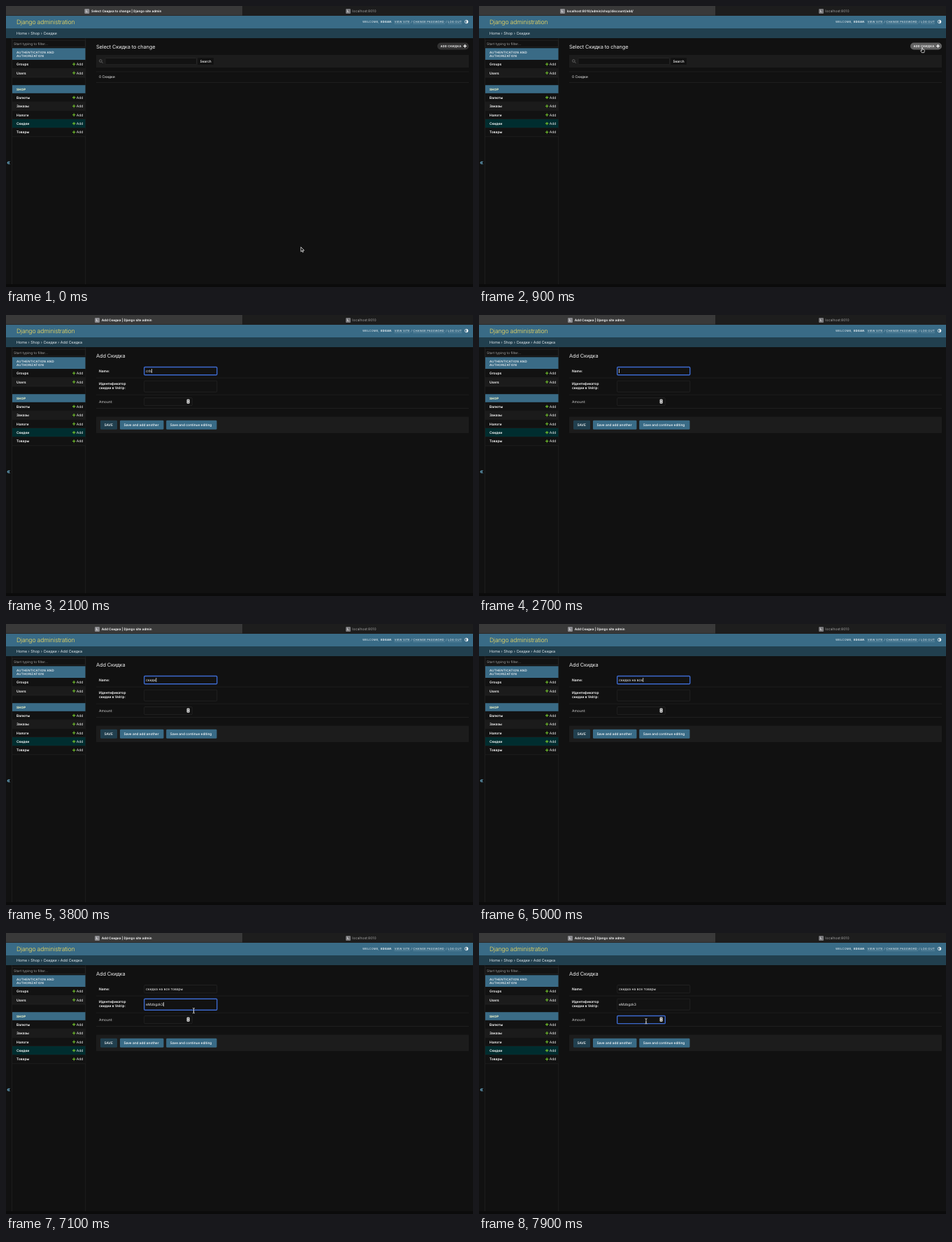
Recreate the animation shown at these times as an HTML page. Size 668x402 px, loop 8 s.

```html
<!DOCTYPE html>
<html lang="ru">
<head>
<meta charset="utf-8">
<title>Admin form</title>
<style>
html, body { margin: 0; width: 100%; height: 100%; overflow: hidden; background: #111; }
svg { display: block; width: 100vw; height: 100vh; }
text {
  font-family: Inter, Roboto, "Noto Sans", sans-serif;
  font-size: 5px; fill: #eee; white-space: pre;
  text-rendering: geometricPrecision;
}
.tab { font-size: 4.68px; font-weight: 600; fill: #fff; }
.dim { fill: #a2a2a2; }
.brand { font-size: 8.7px; font-weight: 300; letter-spacing: -.2px; fill: #f5dd5d; }
.tools { font-size: 4.1px; letter-spacing: .2px; fill: #e9f0f3; }
.crumb { font-size: 5.38px; fill: #e2eaee; }
.cap { font-size: 4.44px; font-weight: 500; letter-spacing: .19px; fill: #fff; }
.cur { font-weight: 700; fill: #ffc; }
.bold { font-size: 4.88px; font-weight: 600; fill: #fff; }
.btn { font-size: 4.82px; font-weight: 500; fill: #fff; }
.h1 { font-size: 7.4px; letter-spacing: -.12px; }
.pill { font-size: 4.1px; font-weight: 600; letter-spacing: .17px; fill: #fff; }
.line { stroke: #2a2a2a; stroke-width: .5; fill: none; }
.field { fill: #121212; stroke: #303030; stroke-width: .5; }
.field.on { stroke: #3c69cd; stroke-width: 1.4; }
</style>
</head>
<body>
<svg viewBox="0 0 668 402" preserveAspectRatio="none">
  <rect width="668" height="402" fill="#111"/>

  <!-- browser tabs -->
  <rect width="668" height="14" fill="#1d1d1d"/>
  <rect width="338" height="13.5" fill="#393939"/>
  <g id="tab">
    <rect y="4" width="7" height="7" rx="1.3" fill="#8b8b8f"/>
    <text class="tab" x="2" y="9.3">L</text>
    <text class="tab" x="9.8" y="9.2" id="tabText"></text>
  </g>
  <rect x="486" y="4" width="7" height="7" rx="1.3" fill="#77777a"/>
  <text class="tab" x="488" y="9.3">L</text>
  <text class="dim" x="495.3" y="9.2">localhost:8010</text>

  <!-- header -->
  <rect y="14" width="668" height="18" fill="#396b86"/>
  <rect y="32" width="668" height="14" fill="#213f4e"/>
  <text class="brand" x="15" y="26">Django administration</text>
  <g class="tools">
    <text class="tools" x="510" y="23.8">WELCOME,</text>
    <text class="tools" x="536" y="23.8"><tspan font-weight="700">EDGAR</tspan>.</text>
    <text class="tools" x="555.5" y="23.8">VIEW SITE</text>
    <text class="tools" x="579.2" y="23.8">/</text>
    <text class="tools" x="582.2" y="23.8">CHANGE PASSWORD</text>
    <text class="tools" x="629" y="23.8">/</text>
    <text class="tools" x="632" y="23.8">LOG OUT</text>
    <path d="M555.5 25.2H578M582.2 25.2H628M632 25.2H652" stroke="#8fb0c0" stroke-width=".4"/>
  </g>
  <circle cx="658.6" cy="22.5" r="2.3" fill="none" stroke="#fff" stroke-width=".7"/>
  <path d="M658.6 20.2a2.3 2.3 0 0 1 0 4.6z" fill="#fff"/>
  <text class="crumb" x="15" y="41.3" id="crumb"></text>

  <!-- sidebar -->
  <path class="line" d="M8.5 46V398M113.7 46V398"/>
  <text x="1.1" y="227.2" style="font-size:9px;fill:#81d4fa">«</text>
  <rect class="field" x="9" y="49" width="104.5" height="9.3"/>
  <text class="dim" x="11" y="55.6" style="font-size:4.95px">Start typing to filter…</text>
  <rect x="9" y="60.3" width="104.5" height="16.8" fill="#3a6b86"/>
  <text class="cap" x="15" y="67.9">AUTHENTICATION AND</text>
  <text class="cap" x="15" y="73.2">AUTHORIZATION</text>
  <rect x="9" y="113.2" width="104.5" height="11.8" fill="#3a6b86"/>
  <text class="cap cur" x="15" y="120.8">SHOP</text>
  <g id="rows"></g>

  <!-- list page -->
  <g id="list">
    <text class="h1" x="129" y="61">Select Скидка to change</text>
    <rect id="pill" x="617" y="52.5" width="45" height="10" rx="5"/>
    <text class="pill" x="621.5" y="59">ADD СКИДКА</text>
    <path d="M654.2 57.4h4.6M656.5 55.1v4.6" stroke="#fff" stroke-width="1.2"/>
    <rect x="129" y="70" width="533" height="18" fill="#1c1c1c"/>
    <circle cx="135.3" cy="78.5" r="1.8" fill="none" stroke="#777" stroke-width=".7"/>
    <path d="M136.6 79.8l2 2" stroke="#777" stroke-width=".8"/>
    <rect class="field" x="142" y="74.5" width="130.5" height="9.2" rx="1"/>
    <rect x="274.3" y="74.3" width="22.7" height="9.6" rx="1" fill="#111"/>
    <text class="btn" x="277.4" y="80.8">Search</text>
    <path class="line" d="M129 94H662M129 109.5H662"/>
    <text x="133" y="103.2">0 Скидки</text>
  </g>

  <!-- form page -->
  <g id="form">
    <text class="h1" x="129" y="61">Add Скидка</text>
    <path class="line" d="M129 90H662M129 114.2H662M129 133.5H662"/>
    <text class="bold" x="133" y="82.1">Name:</text>
    <text class="bold" x="133" y="100">Идентификатор</text>
    <text class="bold" x="133" y="106.4">скидки в Velrip:</text>
    <text x="133" y="126" style="fill:#d0d0d0">Amount:</text>
    <rect class="field" x="197.7" y="74.5" width="104.1" height="11.3" rx="1.2"/>
    <rect class="field" x="197.7" y="94.2" width="104.1" height="16" rx="1.2"/>
    <rect class="field" x="197.7" y="118.5" width="68.6" height="11.1" rx="1.2"/>
    <rect x="258.6" y="120.4" width="4.1" height="6.4" rx="1.4" fill="#e4e4e4"/>
    <path d="M259.6 123l1.05-1.3 1.05 1.3M259.6 124.2l1.05 1.3 1.05-1.3" fill="none" stroke="#222" stroke-width=".7"/>
    <text x="200" y="82" id="name"></text>
    <text x="200" y="104" id="code"></text>
    <rect id="caret" width=".7" height="6" fill="#fff"/>
    <rect x="129" y="145.5" width="533" height="23.5" rx="1" fill="#1c1c1c"/>
    <rect x="135" y="150.7" width="24" height="13" rx="1.3" fill="#213f4e"/>
    <text class="btn" x="140.4" y="158.9">SAVE</text>
    <rect x="163" y="150.7" width="62.5" height="13" rx="1.3" fill="#396b86"/>
    <text class="btn" x="168.4" y="158.9">Save and add another</text>
    <rect x="229.2" y="150.7" width="72.3" height="13" rx="1.3" fill="#396b86"/>
    <text class="btn" x="234.8" y="158.9">Save and continue editing</text>
  </g>

  <rect y="398" width="668" height="4" fill="#0b0b0b"/>

  <!-- pointers, hot spot at 0,0 -->
  <g id="mouse">
    <path id="arrow" d="M0 0V6.6L1.5 5.2 2.5 7.5 3.6 7 2.6 4.8H4.7Z" fill="#111" stroke="#fff" stroke-width=".7"/>
    <path id="hand" d="M-.6 .5Q0-.4 .6 .5V2.8L2.9 3.4Q3.6 3.7 3.4 4.8L2.7 7.4H-.6L-2.4 4.6Q-2.2 3.7-.6 4.7Z" fill="#111" stroke="#fff" stroke-width=".7"/>
    <path id="beam" d="M-1.5-3.7Q0-3.7 0-2.6 0-3.7 1.5-3.7M0-2.8V2.8M-1.5 3.7Q0 3.7 0 2.6 0 3.7 1.5 3.7M-.8 1.1H.8" fill="none" stroke="#e4e4e4" stroke-width=".8"/>
  </g>
</svg>
<script>
const $ = id => document.getElementById(id);
const LOOP = 8000, STEP = 100;
const OPEN = 1000, TO_CODE = 6000, PASTE = 6600, TO_AMOUNT = 7400;

// sidebar rows: label, top, background
$('rows').innerHTML = [
  ['Groups', 77.2, '#121212'], ['Users', 89.6, '#1b1b1b'],
  ['Валюты', 124.8, '#121212'], ['Заказы', 137.2, '#1b1b1b'],
  ['Налоги', 149.6, '#121212'], ['Скидки', 162, '#002d2f'],
  ['Товары', 174.4, '#121212']
].map(([label, y, bg]) => `
  <rect x="9" y="${y}" width="104.5" height="12.4" fill="${bg}"/>
  <path class="line" d="M9 ${y + 12.4}H113.5"/>
  <text class="bold" x="15" y="${y + 8}">${label}</text>
  <path d="M95 ${y + 6.1}h4.4M97.2 ${y + 3.9}v4.4" stroke="#70bf2b" stroke-width="1.1"/>
  <text x="100.7" y="${y + 8}">Add</text>`).join('');

const slip = { text: 'crb', at: [1700, 2000, 2100] };
const phrase = {
  text: 'скидка на все товары',
  at: [3000, 3100, 3200, 3400, 3800, 4000, 4100, 4400, 4500, 4500,
       4700, 4800, 5000, 5100, 5200, 5300, 5400, 5500, 5600, 5800]
};
const typed = (k, t) => k.text.slice(0, k.at.filter(a => a <= t).length);

// time, x, y
const path = [
  [0, 421.8, 344.8], [100, 470, 282], [200, 585, 120], [300, 631, 48],
  [500, 632, 54], [700, 634, 59.3], [900, 634, 59.3], [1000, 570, 66],
  [1100, 400, 84], [1200, 298, 94.5], [6900, 298, 96], [7300, 239, 126.2]
];

function mouseAt(t) {
  const i = path.findIndex(p => p[0] > t);
  if (i < 0) return path[path.length - 1].slice(1);
  const [a, b] = [path[i - 1], path[i]];
  const k = (t - a[0]) / (b[0] - a[0]);
  return [1, 2].map(n => a[n] + (b[n] - a[n]) * k);
}

const show = (id, on) => $(id).style.display = on ? '' : 'none';
const put = (id, s) => { if ($(id).textContent !== s) $(id).textContent = s; };
const fields = document.querySelectorAll('#form .field');

function draw(t) {
  const form = t >= OPEN;
  show('list', !form);
  show('form', form);

  const [title, tabX] =
    form ? ['Add Скидка | Django site admin', 127] :
    t >= 900 ? ['localhost:8010/admin/shop/discount/add/', 116] :
    ['Select Скидка to change | Django site admin', 112.3];
  put('tabText', title);
  $('tab').setAttribute('transform', `translate(${tabX})`);
  put('crumb', 'Home › Shop › Скидки' + (form ? ' › Add Скидка' : ''));

  const hover = t >= 500 && !form;
  $('pill').setAttribute('fill', hover ? '#626262' : '#333');

  const name = t < 2600 ? typed(slip, t) : t < 2700 ? 'c' : typed(phrase, t);
  put('name', name);
  put('code', t >= PASTE ? 'eMzbgzk3' : '');

  const focus = t < TO_CODE ? 0 : t < TO_AMOUNT ? 1 : 2;
  fields.forEach((f, i) => f.classList.toggle('on', i === focus));
  if (form) {
    const w = focus < 2 ? $(['name', 'code'][focus]).getComputedTextLength() : 0;
    $('caret').setAttribute('x', 200.2 + w);
    $('caret').setAttribute('y', [77, 99, 121][focus]);
    show('caret', !(t >= 1500 && t < 1700) && t < 7900);
  }

  const beam = t >= 1200;
  show('mouse', t < 1700 || t >= 6900);
  show('arrow', !hover && !beam);
  show('hand', hover);
  show('beam', beam);
  $('mouse').setAttribute('transform', `translate(${mouseAt(t)})`);
}

const start = performance.now();
function tick() {
  const ms = (performance.now() - start) % LOOP;
  draw(Math.floor(ms / STEP) * STEP);
  requestAnimationFrame(tick);
}
tick();
</script>
</body>
</html>
```
